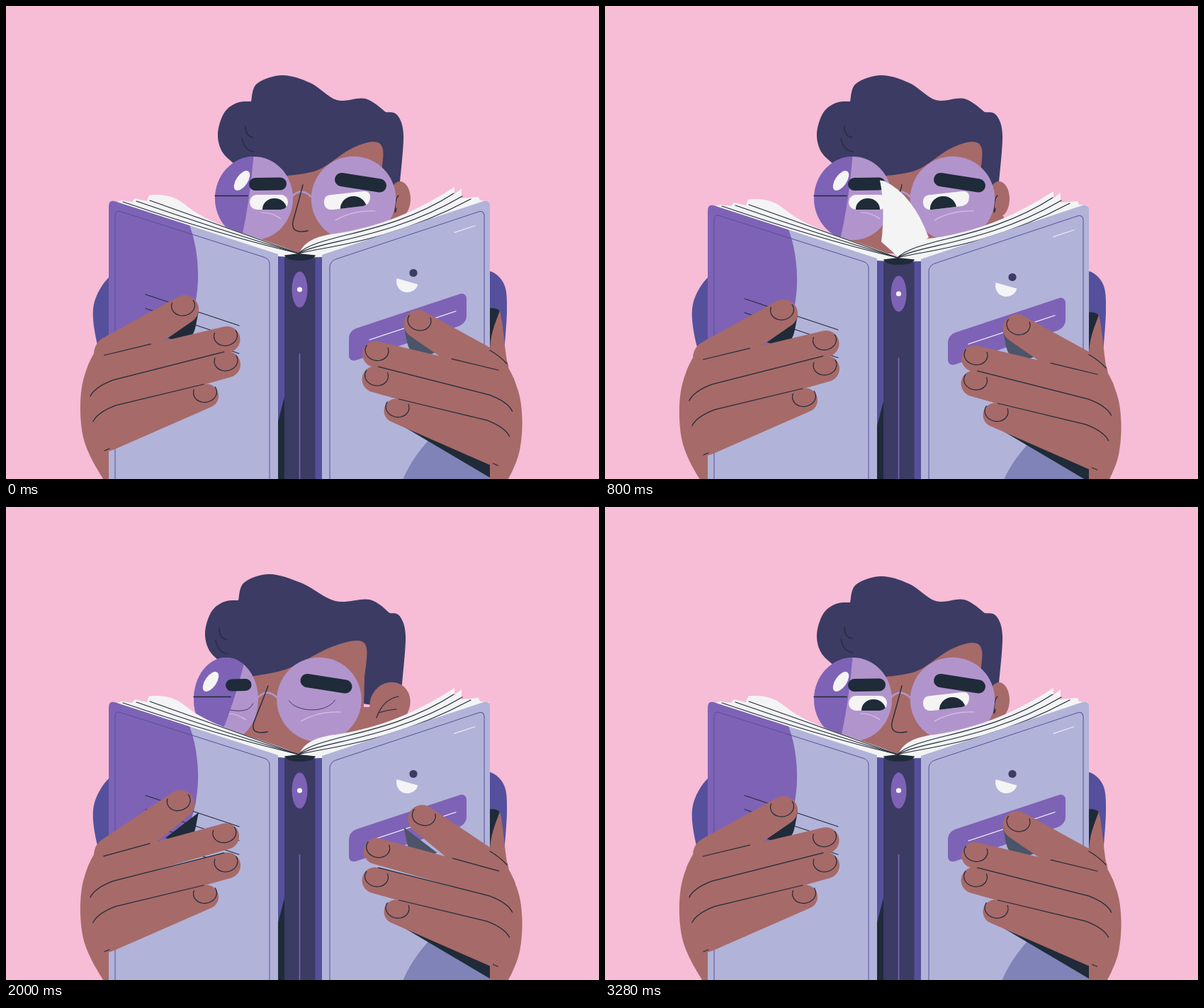
An HTML page with a canvas for the animation above (3360 ms loop, 837 by 669 pixels).

```html
<!DOCTYPE html>
<html lang="en">
<head>
<meta charset="utf-8">
<title>Reader</title>
<style>
html, body { margin: 0; width: 100%; height: 100%; overflow: hidden; background: #f7bcd6; }
canvas { display: block; }
</style>
</head>
<body>
<canvas id="stage" width="837" height="669"></canvas>
<script>
const ctx = document.getElementById('stage').getContext('2d');
const LOOP = 3360, STEP = 80;
const PINK = '#f7bcd6', HAIR = '#3b3b64', SKIN = '#a66a69', DARK = '#1f2b38',
  INDIGO = '#55509c', PURPLE = '#7e62b6', LENS = '#b294cd', GLINT = '#d6c0e4',
  COVER = '#b2b3d9', SHADE = '#7f83b7', WHITE = '#f4f4f5';

const mix = (a, b, k) => a + (b - a) * k;
const clamp = k => Math.max(0, Math.min(1, k));
const smooth = k => k * k * (3 - 2 * k);
const ramp = (x, a, b) => smooth(clamp((x - a) / (b - a)));
const bump = (t, at, half) => (1 + Math.cos(Math.PI * clamp(Math.abs(t - at) / half))) / 2;

function track(t, keys, ease = smooth) {
  if (t <= keys[0][0]) return keys[0][1];
  for (let i = 1; i < keys.length; i++) {
    const [t0, a] = keys[i - 1], [t1, b] = keys[i];
    if (t <= t1) return mix(a, b, ease((t - t0) / (t1 - t0)));
  }
  return keys[keys.length - 1][1];
}

function fill(color, path) { ctx.fillStyle = color; ctx.fill(path); }
function line(color, width, path) {
  ctx.strokeStyle = color; ctx.lineWidth = width; ctx.lineCap = 'round';
  ctx.stroke(path);
}
function group(draw) { ctx.save(); draw(); ctx.restore(); }

const svg = d => new Path2D(d);
// Path text with every "x y" pair moved by a rule.
const bent = (d, rule) => svg(d.replace(/(-?[\d.]+) (-?[\d.]+)/g, (_, x, y) => rule(+x, +y).join(' ')));
function oval(x, y, rx, ry, turn = 0, from = 0, to = Math.PI * 2) {
  const path = new Path2D();
  path.ellipse(x, y, rx, ry, turn, from, to);
  return path;
}
function box(x, y, w, h, r) {
  const path = new Path2D();
  path.roundRect(x, y, w, h, r);
  return path;
}
// Smooth runs through key points, with a corner where two runs meet.
function spline(runs, rule = (x, y) => [x, y]) {
  const path = new Path2D();
  runs.forEach((run, n) => {
    const p = run.map(([x, y]) => rule(x, y)), at = i => p[Math.max(0, Math.min(p.length - 1, i))];
    if (n) path.lineTo(...p[0]); else path.moveTo(...p[0]);
    for (let i = 0; i + 1 < p.length; i++) {
      const [a, b, c, d] = [at(i - 1), at(i), at(i + 1), at(i + 2)];
      path.bezierCurveTo(b[0] + (c[0] - a[0]) / 6, b[1] + (c[1] - a[1]) / 6,
        c[0] - (d[0] - b[0]) / 6, c[1] - (d[1] - b[1]) / 6, c[0], c[1]);
    }
  });
  return path;
}

function eye(shape, x, rx, ry, open) {
  group(() => {
    ctx.translate(0, 284 * (1 - open));
    ctx.scale(1, open);
    fill(WHITE, shape);
    ctx.clip(shape);
    fill(DARK, oval(x, 287, rx, ry));
  });
}

function head(h, look, open) {
  const turnHair = (x, y) => [x + h * (25 * ramp(x, 390, 520) - 18 - 4 * ramp(x, 520, 560)),
    y - h * 3 * (1 - ramp(x, 390, 460))];
  const turnFace = (x, y) => [x + h * (27 * ramp(x, 400, 530) - 50), y - 3 * h * ramp(y, 245, 230)];
  const turnNose = (x, y) => [x - h * (49 + 8 * (y - 253) / 66), y];

  fill(HAIR, spline([
    [[324, 225], [305, 206], [299, 180], [308, 151], [326, 137], [346, 135]],
    [[346, 135], [354, 110], [390, 98], [430, 109], [467, 133], [507, 131], [536, 150]],
    [[536, 150], [552, 154], [561, 182], [556, 250]],
    [[545, 285], [400, 262]]], turnHair));
  group(() => {
    ctx.translate(-37 * h, 1.5 * h);
    line(DARK, 1.2, svg('M333 187C335 198 341 205 350 206M338 170C338 179 342 185 349 186'));
  });
  fill(SKIN, spline([
    [[390, 241], [440, 232], [485, 203], [518, 192], [532, 203], [529, 242]],
    [[528, 283]], [[545, 283]], [[563, 298]], [[560, 350]], [[345, 350]], [[335, 250]]], turnFace));
  fill(SKIN, oval(mix(556, 542, h), mix(273, 278, h), mix(15, 28, h), mix(25, 31, h), .5 * h));
  line(DARK, 1.2, svg(`M554 268Q${mix(549, 532, h)} 272 ${mix(549, 523, h)} ${mix(292, 298, h)}`));
  line(DARK, 1.2, svg(`M${mix(550, 526, h)} 291Q${mix(551, 538, h)} 287 551 286`));

  // Small lens
  const cx = mix(350, 310.5, h), lens = oval(cx, 272, mix(55, 45.5, h), 59);
  fill(LENS, lens);
  line(GLINT, 1.2, svg(`M${cx + 11 - 10 * h} 292q15 0 27 9`));
  if (open) eye(box(mix(344, 300, h), 267, mix(54, 49, h), 21, 10), cx + 29 + .62 * look, 17, 15, open);
  else line(HAIR, 1, svg(`M${cx + 5} 287q28 5 33 -9`));
  group(() => {
    ctx.clip(lens);
    fill(PURPLE, svg(`M${mix(350, 340, h)} 205Q${mix(345, 324, h)} 275 ${mix(331, 298, h)} 335H230V205Z`));
  });
  line(DARK, 1.5, svg(`M${mix(295, 265, h)} 268.5H${mix(341, 317, h)}`));
  fill(WHITE, oval(mix(333, 289, h), 247, 8, 16, .6));
  line(DARK, mix(18, 17, h), svg(`M${mix(352, 318.5, h)} 252L${mix(387, 338, h)} 251.5`));

  // Large lens
  group(() => {
    ctx.translate(-48.5 * h, 0);
    fill(LENS, oval(490.5, 272.5, 59.7, 59.7));
    line(GLINT, 1.2, svg('M465 303Q489 289 521 290'));
    if (open) eye(bent('M449 277Q449 267 460 267L504 262Q514 261 514 270Q514 281 504 283L462 288Q449 289 449 277Z', (x, y) => [x, y]), 490.5 + look, 18.7, 18, open);
    else line(HAIR, 1, svg('M448 274C458 290 500 293 513 273'));
    line(DARK, 19, svg('M473.5 245.5L527.5 254'));
  });
  const left = mix(404, 356, h);
  line(LENS, 2.6, svg(`M${left} 269q13 -13 27 1`));
  line(DARK, 1.3, bent('M419 253C414 273 409 290 405 305Q402 323 426 318', turnNose));
}

// A leaf hinged at the spine; its feet and bends follow from the tip.
function page(t) {
  if (t < 160 || t > 1600) return;
  const x = track(t, [[160, 204], [480, 326], [800, 388], [1280, 455], [1600, 632]], k => k);
  const y = 246 + (x - 415) ** 2 * .0006;
  const foot = fx => `${fx} ${340 - .28 * Math.abs(fx - 413)}`;
  const right = .5 * x + 263;
  fill(WHITE, svg(`M${x} ${y}Q${x + 8} ${y + 39} ${foot(x + 2)}L413 354L${foot(right)}Q${(x + right) / 2 + 12} ${y + 20} ${x + 6} ${y + 1}Z`));
}

function leftCover(squeeze) {
  const bend = (x, y) => {
    const u = Math.max(0, (384 - x) / 239);
    return [x + 29 * squeeze * (1 - Math.max(0, 1 - u) ** 2.5), y - 9 * squeeze * u];
  };
  fill(WHITE, bent('M150 279L163 275L178 277L182 272L199 276L202 267.5C235 265 245 275 262 288C300 315 370 330 413 350L413 356L384 354Z', bend));
  for (let i = 0; i < 3; i++)
    line(DARK, 1.2, bent(`M${165 + 19 * i} ${277 - i}Q300 ${323 - 6.5 * i} 413 350`, bend));
  const board = bent('M145 284Q145 274 153 276L384 351L384 700L145 700Z', bend);
  fill(COVER, board);
  group(() => {
    ctx.clip(board);
    fill(PURPLE, bent('M130 260L250 290C275 335 276 400 262 440C250 475 220 495 130 490Z', bend));
  });
  line(INDIGO, 1, bent('M154 700L154 297Q154 288 161 290.5L365 355.5Q372 358 372 365L372 700', bend));
  for (let i = 0; i < 4; i++) {
    const y = 408 + i * 19.7;
    line(DARK, 1.1, bent(`M197 ${y}L329 ${y + 44}`, bend));
  }
}

function rightCover(lift) {
  fill(WHITE, svg('M413 352C420 332 440 325 465 322C530 312 580 290 633 256V266L643 258V272L667 270L669 275L683 276L446 355L413 356Z'));
  for (let i = 0; i < 3; i++)
    line(DARK, 1.2, svg(`M413 350C${440 + 5 * i} ${322 + 9 * i} 540 ${325 + 5 * i} ${632 + 12 * i} ${265 + 4 * i}`));
  group(() => {
    // Sheared so that the slanted edges become level
    ctx.transform(1, -.333, 0, 1, 0, .333 * 446);
    const board = box(446, 352, 237, 400, [0, 9, 0, 0]);
    fill(COVER, board);
    line(INDIGO, 1, box(457, 364.5, 218, 400, 8));
    line(WHITE, 1.2, svg('M633 382.7H662'));
    fill(PURPLE, box(484, 472, 166, 45, 10));
    line(WHITE, 1.2, svg('M513 494.5H635'));
  });
  group(() => {
    ctx.clip(svg('M446 340H683V700H446Z'));
    fill(SHADE, svg('M610 600C585 625 570 645 558 675H700V625Z'));
    fill(DARK, svg(`M${563 + 3 * lift} 596L700 640V677Z`));
  });
  fill(HAIR, oval(575, 377.5, 5.6, 5.6));
  fill(WHITE, oval(566.5, 389.5, 15.5, 15.5, .27, 0, Math.PI));
}

function spine() {
  fill(INDIGO, svg('M384 351H446V700H384Z'));
  fill(HAIR, svg('M393 352H436.5V700H393Z'));
  fill(DARK, svg('M393 553L384 588V700H393Z'));
  line(PURPLE, 1.6, svg('M414.5 492V700'));
  fill(PURPLE, oval(414.5, 401, 11, 25.5));
  fill(WHITE, oval(414.5, 401, 3.6, 3.6));
}

const palm = spline([
  [[160, 466], [130, 483], [111, 522], [105, 562], [108, 605], [119, 637], [137, 669], [152, 695]],
  [[200, 695]], [[200, 480]]]);
// Tapered fingers from base circle to tip circle.
const fingers = [
  { x0: 150, y0: 492, r0: 26, x1: 252, y1: 429, r1: 20, at: 2000, turn: 5 },
  { x0: 134, y0: 515, r0: 19.5, x1: 312, y1: 471.5, r1: 18.5, at: 1800, turn: 6, crease: .42 },
  { x0: 134, y0: 555, r0: 20.5, x1: 312.5, y1: 507, r1: 18.5, at: 1450, turn: 6, crease: 1, hook: 17 },
  { x0: 140, y0: 600, r0: 30, x1: 283, y1: 551.5, r1: 17, at: 1280, turn: 6.5, crease: 1, hook: 17 }];
const tap = (f, t) => f.turn * bump(t, f.at, 320);

function finger(f) {
  const { x0, y0, r0, x1, y1, r1 } = f;
  const a = Math.atan2(y1 - y0, x1 - x0), b = Math.acos((r0 - r1) / Math.hypot(x1 - x0, y1 - y0));
  const body = new Path2D(), c = Math.cos(a - b), s = Math.sin(a - b);
  body.arc(x1, y1, r1, a - b, a + b);
  body.arc(x0, y0, r0, a + b, a - b + 2 * Math.PI);
  fill(SKIN, body);
  if (f.crease) {
    const px = x0 + r0 * c, py = y0 + r0 * s, k = f.crease;
    const start = f.hook ? `M${px - 10} ${py + f.hook}Q${px - 4} ${py + 4} ${px + 22} ${py - 6}` : `M${px + 9} ${py - 2}`;
    line(DARK, 1.2, svg(`${start}L${mix(px, x1 + r1 * c, k)} ${mix(py, y1 + r1 * s, k)}`));
  }
  line(DARK, 1.2, oval(x1 - 2, y1 - 5, 16.5, 14, -.15, -.4, 3.6));
}

function hand(t, shadow, squeeze) {
  fill(shadow, svg('M225 468L272 432C268 448 268 460 262 466L240 474Z'));
  for (const f of fingers) group(() => {
    ctx.translate(f.x0, f.y0);
    ctx.rotate(-(tap(f, t) + 9 * squeeze) * Math.PI / 180);
    ctx.translate(-f.x0, -f.y0);
    finger(f);
  });
  line(DARK, 1.2, svg('M139 629L146 626'));
}

function draw(t) {
  const turn = ramp(t, 960, 1500) - ramp(t, 2700, 3220);
  const look = track(t, [[80, 0], [480, -20], [800, -13], [1680, -16], [2700, -16], [3220, 0]]);
  const bob = track(t, [[0, 0], [480, 3], [800, 6], [1280, 5], [1840, 0]]);
  const squeeze = ramp(t, 60, 480) - ramp(t, 480, 800);
  const open = clamp((Math.abs(t - 1960) - 40) / 160);

  const pull = () => ctx.translate(29 * squeeze, 0);
  const flip = () => ctx.transform(-1, 0, 0, 1, 833.5, 21);

  ctx.fillStyle = PINK;
  ctx.fillRect(0, 0, 837, 669);
  fill(INDIGO, spline([[[200, 370], [174, 373], [145, 384], [124, 422], [127, 470], [143, 520]], [[200, 520]]]));
  fill(INDIGO, spline([[[665, 374], [688, 377], [704, 396], [707, 432], [703, 492]], [[670, 500]]]));
  head(turn, look, open);
  page(t);

  group(() => {
    ctx.translate(0, bob);
    fill(DARK, svg('M675 428C690 426 697 428 697 434L690 500H675Z'));
    fill(SKIN, svg('M697 431C690 450 683 465 683 490L700 520L708 508C703 480 702 450 697 431Z'));
    group(() => { pull(); fill(SKIN, palm); });
    group(() => { flip(); fill(SKIN, palm); });
    spine();
    leftCover(squeeze);
    rightCover(tap(fingers[3], t));
    fill(DARK, svg('M393 352.5L413 350L437 352.5Q434 360 414 360Q396 360 393 352.5Z'));
    group(() => { pull(); hand(t, DARK, squeeze); });
    group(() => { flip(); hand(t, '#4b5468', 0); });
    line(DARK, 1.2, svg('M683 487Q697 495 707 506'));
  });
}

const start = performance.now();
function tick() {
  const t = (performance.now() - start) % LOOP;
  draw(Math.floor(t / STEP) * STEP);
  requestAnimationFrame(tick);
}
tick();
</script>
</body>
</html>
```
